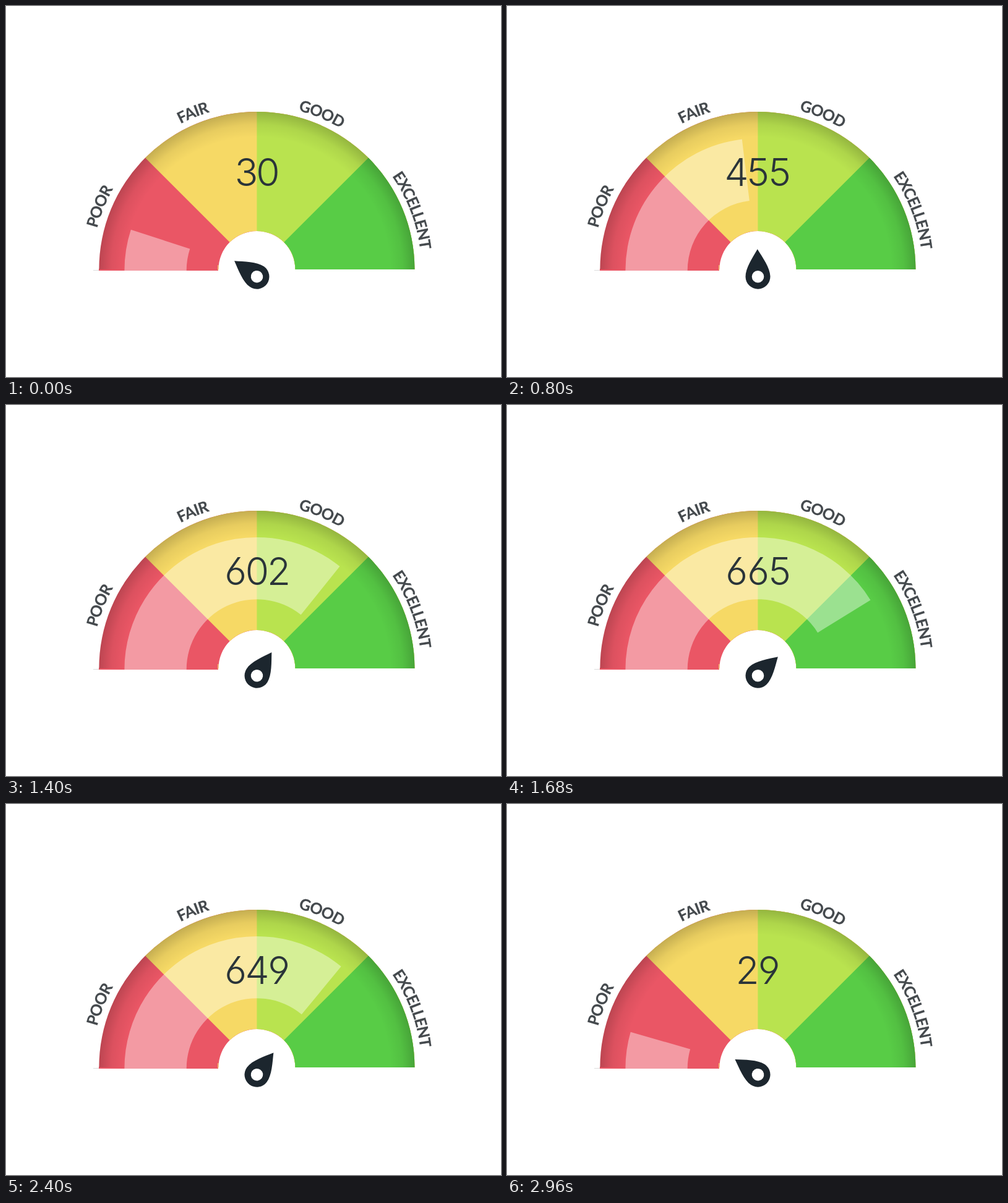
Recreate the animation shown at these times as an HTML page. Size 800 px wide and 600 px high, loop 3 s.

```html
<!DOCTYPE html>
<html lang="en">
<head>
<meta charset="utf-8">
<title>Score gauge</title>
<style>
  html, body { margin: 0; width: 100%; height: 100%; overflow: hidden; background: #fff; }
  svg { display: block; width: 800px; height: 600px; }
  text { text-anchor: middle; }
  .label { font: 700 25px Lato, sans-serif; letter-spacing: -.9px; fill: #44494d; stroke: #44494d; stroke-width: .25px; }
  #score { font: 300 62px Inter, sans-serif; font-feature-settings: "cv03", "cv04"; fill: #2a3439; }
</style>
</head>
<body>
<svg viewBox="0 0 800 600">
  <defs>
    <radialGradient id="shade" gradientUnits="userSpaceOnUse" cx="405.5" cy="427" r="256">
      <stop offset=".84" stop-opacity="0"/>
      <stop offset=".92" stop-opacity=".06"/>
      <stop offset="1" stop-opacity=".2"/>
    </radialGradient>
    <path id="rim" d="M138.5 427A266.5 266.5 0 0 1 671.5 427"/>
  </defs>
  <path d="M141 427.5h9" stroke="#ddd"/>
  <path d="M150 425h193v3h-193z" fill="#ea5665"/>
  <g id="dial"></g>
  <path d="M342.7 419v8" stroke="#f6d965"/>
  <path id="sweep" fill="#fff" opacity=".4"/>
  <g id="labels"></g>
  <text id="score" y="290.5"></text>
  <g id="needle">
    <path d="M0-44.5C8-31 20-14 20 0A20 20 0 0 1-20 0C-20-14-8-31 0-44.5Z" fill="#1c262e"/>
    <circle r="9.8" fill="#fff"/>
  </g>
</svg>
<script>
const $ = id => document.getElementById(id);

// Angles run clockwise in degrees, 0 = left end of the gauge.
function ring(cy, inner, outer, from, to) {
  const at = (r, deg) => {
    const a = deg * Math.PI / 180;
    return `${405.4 - r * Math.cos(a)} ${cy - r * Math.sin(a)}`;
  };
  return `M${at(outer, from)}A${outer} ${outer} 0 0 1 ${at(outer, to)}` +
    `L${at(inner, to)}A${inner} ${inner} 0 0 0 ${at(inner, from)}Z`;
}

// Each sector reaches to the right end, so the next one covers it without a seam.
$('dial').innerHTML = ['#ea5665', '#f6d965', '#b9e34f', '#58cc46'].map((color, i) =>
  `<path d="${ring(425.9, 62, 255, i * 45, 180)}" fill="${color}"/>`).join('') +
  `<path d="${ring(425.9, 62, 255, 0, 180)}" fill="url(#shade)"/>`;

$('labels').innerHTML = [['POOR', 22], ['FAIR', 67.9], ['GOOD', 112.6], ['EXCELLENT', 159]]
  .map(([word, deg]) => `<text class="label"><textPath href="#rim" startOffset="${deg / 1.8}%">${word}</textPath></text>`)
  .join('');

// time, score, sweep angle, needle angle
const keys = [
  [0, 30, 18, 35],
  [333, 408, 68.4, 78.3],
  [2133, 710, 162.2, 146.8],
  [2640, 597, 101.9, 110.5],
  [2960, 29, 16.05, 33.7],
  [3000, 30, 18, 35]
];

function pose(t) {
  const i = keys.findIndex(k => k[0] > t);
  const a = keys[i - 1], b = keys[i];
  const p = (1 - Math.cos(Math.PI * (t - a[0]) / (b[0] - a[0]))) / 2;
  return a.map((v, j) => v + (b[j] - v) * p);
}

// Digits sit centred on an even pitch.
function showScore(value) {
  const digits = String(Math.round(value));
  $('score').textContent = digits;
  $('score').setAttribute('x', [...digits].map((_, i) => 406 + 35 * (i - (digits.length - 1) / 2)).join(' '));
}

function draw(now) {
  const t = Math.floor(now % 3000 / 40) * 40;
  const [, score, sweep, needle] = pose(t);
  showScore(score);
  $('sweep').setAttribute('d', ring(427.9, 113.7, 214, 0, sweep));
  $('needle').setAttribute('transform', `translate(405.5 437.7) rotate(${needle - 90})`);
  requestAnimationFrame(draw);
}
draw(0);
</script>
</body>
</html>
```
